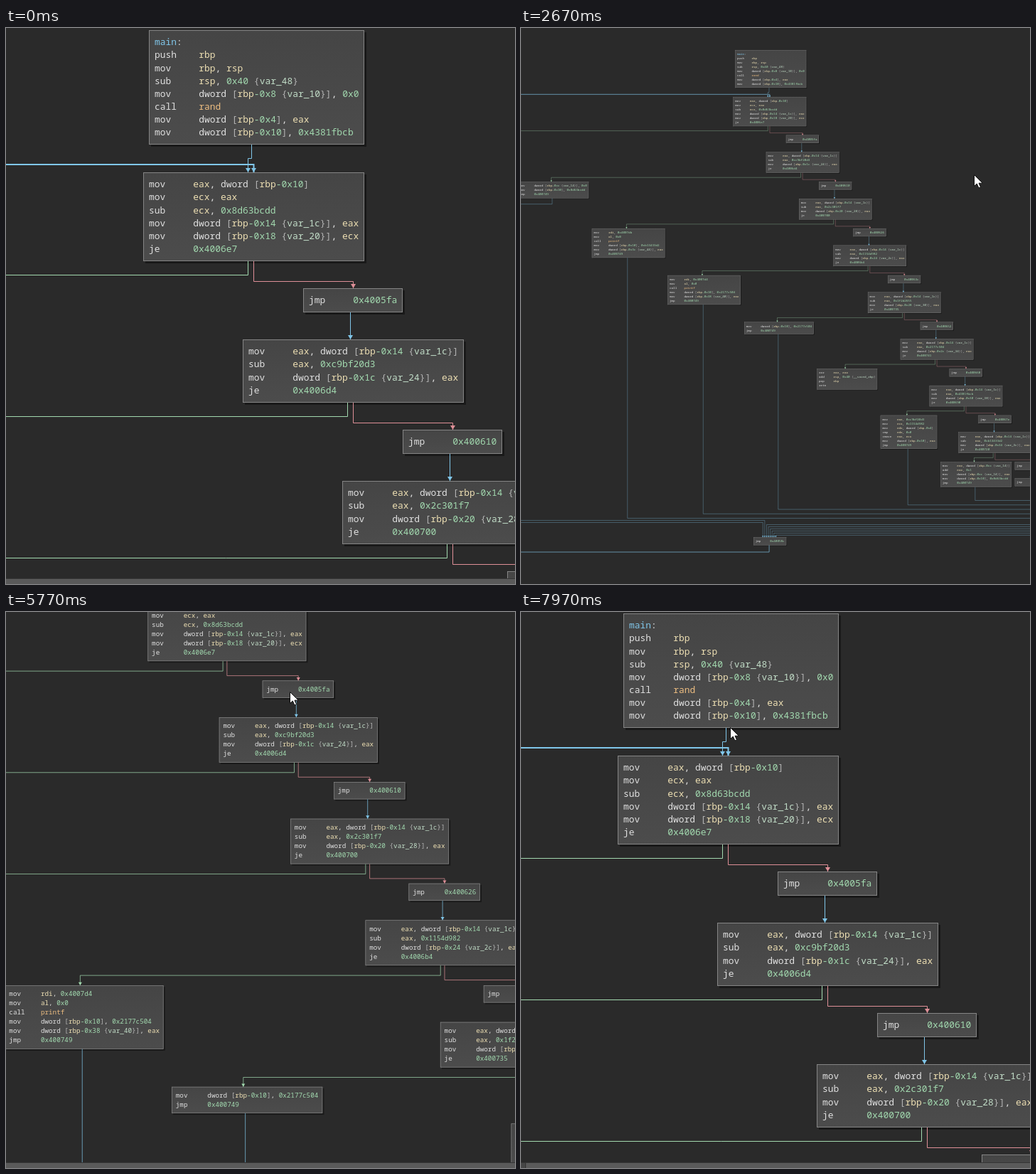
An HTML page with a canvas that plays this animation: 716 by 782 pixels, repeating every 8000 ms.

```html
<!DOCTYPE html>
<html lang="en">
<head>
<meta charset="utf-8">
<title>Flow graph</title>
<style>
html, body { margin: 0; width: 100%; height: 100%; overflow: hidden; background: #2a2a2a; }
canvas { display: block; }
</style>
</head>
<body>
<canvas id="stage" width="716" height="782"></canvas>
<script>
const ctx = document.getElementById('stage').getContext('2d');
const W = 716, H = 782, PANE = 774, LOOP = 8000;
const CHAR = 7.77, LINE = 18.14, PAD = 8, ASCENT = 13.3;
const BLUE = '#80c6e9', GREEN = '#a2d9af', RED = '#de8f97';
const WHITE = '#e0e0e0', YELLOW = '#eddfb3', ORANGE = '#edbd81', PALE = '#c1dcc7', GREY = '#b4b4b4';

// ---- graph ----
function colourOf(word) {
  if (/^-?0x/.test(word)) return GREEN;
  if (/^(r[bs]p|rdi|e[a-d]x|al)$/.test(word)) return YELLOW;
  if (/^(rand|printf)$/.test(word)) return ORANGE;
  if (/^(var_|__)/.test(word)) return PALE;
  if (word === 'main') return BLUE;
  return /^[\w,:]/.test(word) ? WHITE : GREY;
}

const blocks = [], edges = [];

function block(x, y, code) {
  const lines = code.split('\n').map(l => {
    const [, op, args] = l.trim().match(/^(\S+) ?(.*)$/);
    return args ? op.padEnd(8) + args : op;
  });
  const w = Math.round(Math.max(...lines.map(l => l.length)) * CHAR + 2 * PAD);
  const h = Math.round(lines.length * LINE + 2 * PAD);
  const words = [];
  lines.forEach((l, row) => {
    for (const m of l.matchAll(/-?0x[0-9a-f]+|\w+|[^\w\s]/g))
      words.push({ s: m[0], x: x + PAD + m.index * CHAR, y: y + PAD + row * LINE + ASCENT, c: colourOf(m[0]) });
  });
  const b = { x, y, w, h, words, cx: Math.floor(x + w / 2) + .5, end: y + h };
  blocks.push(b);
  return b;
}

function edge(colour, pts, width = 1) { edges.push({ colour, pts, width }); }

const main = block(201, 3, `main:
  push rbp
  mov rbp, rsp
  sub rsp, 0x40 {var_48}
  mov dword [rbp-0x8 {var_10}], 0x0
  call rand
  mov dword [rbp-0x4], eax
  mov dword [rbp-0x10], 0x4381fbcb`);

const head = block(193, 203, `mov eax, dword [rbp-0x10]
  mov ecx, eax
  sub ecx, 0x8d63bcdd
  mov dword [rbp-0x14 {var_1c}], eax
  mov dword [rbp-0x18 {var_20}], ecx
  je 0x4006e7`);

const tests = [
  [333, '0xc9bf20d3', '1c {var_24}', '0x4006d4'],
  [473, '0x2c301f7', '20 {var_28}', '0x400700'],
  [620, '0x1154d982', '24 {var_2c}', '0x4006b4'],
  [767, '0x1f2d2655', '28 {var_30}', '0x400735'],
  [906, '0x2177c504', '2c {var_34}', '0x400741'],
  [1030, '0x4381fbcb', '30 {var_38}', '0x400690'],
  [1154, '0xb13433d2', '34 {var_3c}', '0x400720']
].map(([x, val, slot, to], i) => block(x, 438 + Math.round(199.2 * i), `mov eax, dword [rbp-0x14 {var_1c}]
  sub eax, ${val}
  mov dword [rbp-0x${slot}], eax
  je ${to}`));

const rowY = i => 366 + Math.round(199.2 * i);
const jumps = ['5fa', '610', '626', '63c', '652', '668', '67e', '744']
  .map((to, i) => block(i < 7 ? tests[i].x + 85 : 1394, rowY(i), 'jmp 0x400' + to));
const lastJump = block(1394, 1829, 'jmp 0x400749');
const tail = block(279, 2081, 'jmp 0x40058c');

const print = (str, val, slot) => `mov rdi, ${str}
  mov al, 0x0
  call printf
  mov dword [rbp-0x10], ${val}
  mov dword [rbp-0x${slot}], eax
  jmp 0x400749`;

const kids = [
  [-1062, `mov eax, 0xc9bf20d3
    mov ecx, 0x2c301f7
    cmp dword [rbp-0x8 {var_10}], 0xa
    cmovl eax, ecx
    mov dword [rbp-0x10], eax
    jmp 0x400749`],
  [-727, `mov dword [rbp-0xc {var_14}], 0x0
    mov dword [rbp-0x10], 0x8d63bcdd
    jmp 0x400749`],
  [-410, print('0x4007db', '0xb13433d2', '3c {var_44}')],
  [-87, print('0x4007d4', '0x2177c504', '38 {var_40}')],
  [240, `mov dword [rbp-0x10], 0x2177c504
    jmp 0x400749`],
  [550, `xor eax, eax
    add rsp, 0x40 {__saved_rbp}
    pop rbp
    retn`],
  [821, `mov eax, 0xc9bf20d3
    mov ecx, 0x1154d982
    mov edx, dword [rbp-0x4]
    cmp edx, 0x0
    cmove eax, ecx
    mov dword [rbp-0x10], eax
    jmp 0x400749`],
  [1077, `mov eax, dword [rbp-0xc {var_14}]
    add eax, 0x1
    mov dword [rbp-0xc {var_14}], eax
    mov dword [rbp-0x10], 0x8d63bcdd
    jmp 0x400749`]
].map(([x, code], i) => block(x, rowY(i), code));

edge(BLUE, [[345.5, main.end], [345.5, 183.5], [340.5, 183.5], [340.5, head.y]]);
[head, ...tests].forEach((b, i) => {
  const kid = kids[i], jump = jumps[i], next = tests[i] || lastJump;
  const gy = b.end + 19.5, ry = b.end + 28.5;
  edge(GREEN, [[b.cx - 8, b.end], [b.cx - 8, gy], [kid.cx - 8, gy], [kid.cx - 8, kid.y]]);
  edge(RED, [[b.cx, b.end], [b.cx, ry], [jump.cx, ry], [jump.cx, jump.y]]);
  edge(BLUE, [[jump.cx - 4, jump.end], [jump.cx - 4, next.y]]);
});

const out = b => b.cx - 4;
edge(BLUE, [[out(kids[0]), kids[0].end], [out(kids[0]), 2009], [327, 2009], [327, tail.y]]);
edge(BLUE, [[out(kids[1]), kids[1].end], [out(kids[1]), 660], [-742, 660], [-742, 2018], [319, 2018], [319, tail.y]]);
[kids[2], kids[3], kids[4], kids[6], kids[7], lastJump].forEach((b, i) => {
  const y = i < 5 ? 2000 - 19 * i : 1890, far = 1738 + 7.8 * i, back = 2027 + 9 * i, x = 335 + 7.8 * i;
  edge(BLUE, [[out(b), b.end], [out(b), y], [far, y], [far, back], [x, back], [x, tail.y]]);
});
edge(BLUE, [[346, tail.end], [346, 2144], [-1075, 2144], [-1075, 192], [348.5, 192], [348.5, head.y]], 2);

// ---- motion ----
const pointer = [
  [870, 730, 330], [1130, 637, 269], [1400, 637, 214], [2330, 637, 214], [2670, 638, 207],
  [3310, 638, 207], [3870, 599, 232], [4130, 579, 282], [4700, 428, 176], [4930, 391, 176],
  [5695, 391, 176], [5765, 400, 113], [6000, 400, 113], [6350, 267, 97.2], [6600, 280, 124],
  [6870, 282, 381], [7300, 283, 372.5], [7700, 301, 225], [7960, 295, 163]
];

function pointerAt(t) {
  const i = pointer.findIndex(k => k[0] > t);
  if (i < 1) return pointer[i < 0 ? pointer.length - 1 : 0].slice(1);
  const [t0, x0, y0] = pointer[i - 1], [t1, x1, y1] = pointer[i], p = (t - t0) / (t1 - t0);
  return [x0 + (x1 - x0) * p, y0 + (y1 - y0) * p];
}

const RATIO = .895;
const wheelOut = [1770, 1870, 1950, 2030, 2100, 2330, 2400, 2490, 2580, 2670, 2730, 3070, 3150, 3230, 3310];
const wheelIn = [4730, 4795, 4860, 4930, ...Array.from({ length: 8 }, (_, i) => 5230 + 66 * i), 5800, 5900, 6000];
const wheel = [...wheelOut.map(t => [t, 1]), ...wheelIn.map(t => [t, -1])];

// Keep the span a..b inside the pane lo..hi, or centre it when it fits.
function fit(off, s, a, b, lo, hi) {
  if ((b - a) * s <= hi - lo) return (lo + hi - (a + b) * s) / 2;
  return Math.min(lo - a * s, Math.max(hi - b * s, off));
}

function drag(v, t, from, to) {
  if (t < from) return;
  const [x0, y0] = pointerAt(from), [x1, y1] = pointerAt(Math.min(t, to));
  v.x += x1 - x0;
  v.y += y1 - y0;
}

function viewAt(t) {
  const v = { s: 1, x: 0, y: 0 };
  let n = 0;
  drag(v, t, 1130, 1400);
  for (const [at, step] of wheel) {
    if (t < at) break;
    const [px, py] = pointerAt(at), s = RATIO ** (n += step), k = s / v.s;
    v.x = fit(px - (px - v.x) * k, s, -1080, 1782, -180, 881);
    v.y = fit(py - (py - v.y) * k, s, 0, 2182, 0, 780);
    v.s = s;
  }
  drag(v, t, 6350, 7300);
  return v;
}

// ---- drawing ----
function drawEdge({ colour, pts, width }) {
  const [x, y] = pts[pts.length - 1];
  ctx.strokeStyle = ctx.fillStyle = colour;
  ctx.lineWidth = width;
  ctx.beginPath();
  pts.forEach(p => ctx.lineTo(...p));
  ctx.stroke();
  ctx.beginPath();
  ctx.moveTo(x - 3.5, y - 6);
  ctx.lineTo(x + 3.5, y - 6);
  ctx.lineTo(x, y);
  ctx.fill();
}

function drawBlock(b) {
  ctx.fillStyle = 'rgba(0,0,0,.4)';
  ctx.fillRect(b.x + 3, b.y + 3, b.w, b.h);
  const g = ctx.createLinearGradient(0, b.y, 0, b.end);
  g.addColorStop(0, '#454545');
  g.addColorStop(1, '#4c4c4c');
  ctx.fillStyle = g;
  ctx.fillRect(b.x, b.y, b.w, b.h);
  ctx.strokeStyle = '#858585';
  ctx.lineWidth = 1;
  ctx.strokeRect(b.x + .5, b.y + .5, b.w - 1, b.h - 1);
  for (const w of b.words) {
    ctx.fillStyle = w.c;
    ctx.fillText(w.s, w.x, w.y);
  }
}

function drawScrollbar(v) {
  const x = Math.max(0, Math.round(6 - (v.x + 57) * .4 + (v.s - 1) * 400));
  ctx.fillStyle = '#464646';
  ctx.fillRect(0, PANE, W, H - PANE);
  ctx.fillStyle = '#5a5a5a';
  ctx.fillRect(x, PANE, W - x, H - PANE);
  ctx.fillStyle = '#353535';
  ctx.fillRect(0, PANE, W, 1);
  if (x) ctx.fillRect(x, PANE, 1, H - PANE);
}

const arrow = new Path2D('M0 0V16L3.8 12.6L6.4 18.4L9 17.3L6.5 11.7H11.8Z');

function drawPointer(t) {
  const [x, y] = pointerAt(t);
  ctx.setTransform(1, 0, 0, 1, Math.round(x) - .5, Math.round(y) - .5);
  ctx.fillStyle = '#fff';
  ctx.strokeStyle = '#111';
  ctx.lineWidth = 1;
  ctx.fill(arrow);
  ctx.stroke(arrow);
}

function draw(t) {
  const v = viewAt(t);
  ctx.setTransform(1, 0, 0, 1, 0, 0);
  ctx.fillStyle = '#2a2a2a';
  ctx.fillRect(0, 0, W, H);
  ctx.setTransform(v.s, 0, 0, v.s, Math.round(v.x), Math.round(v.y));
  ctx.font = '12.95px "Noto Sans Mono", "Liberation Mono", monospace';
  blocks.forEach(drawBlock);
  edges.forEach(drawEdge);
  ctx.setTransform(1, 0, 0, 1, 0, 0);
  if (v.s > .4) drawScrollbar(v);
  if (t >= 870) drawPointer(t);
}

const start = performance.now();
function tick() {
  draw((performance.now() - start) % LOOP);
  requestAnimationFrame(tick);
}
tick();
</script>
</body>
</html>
```
